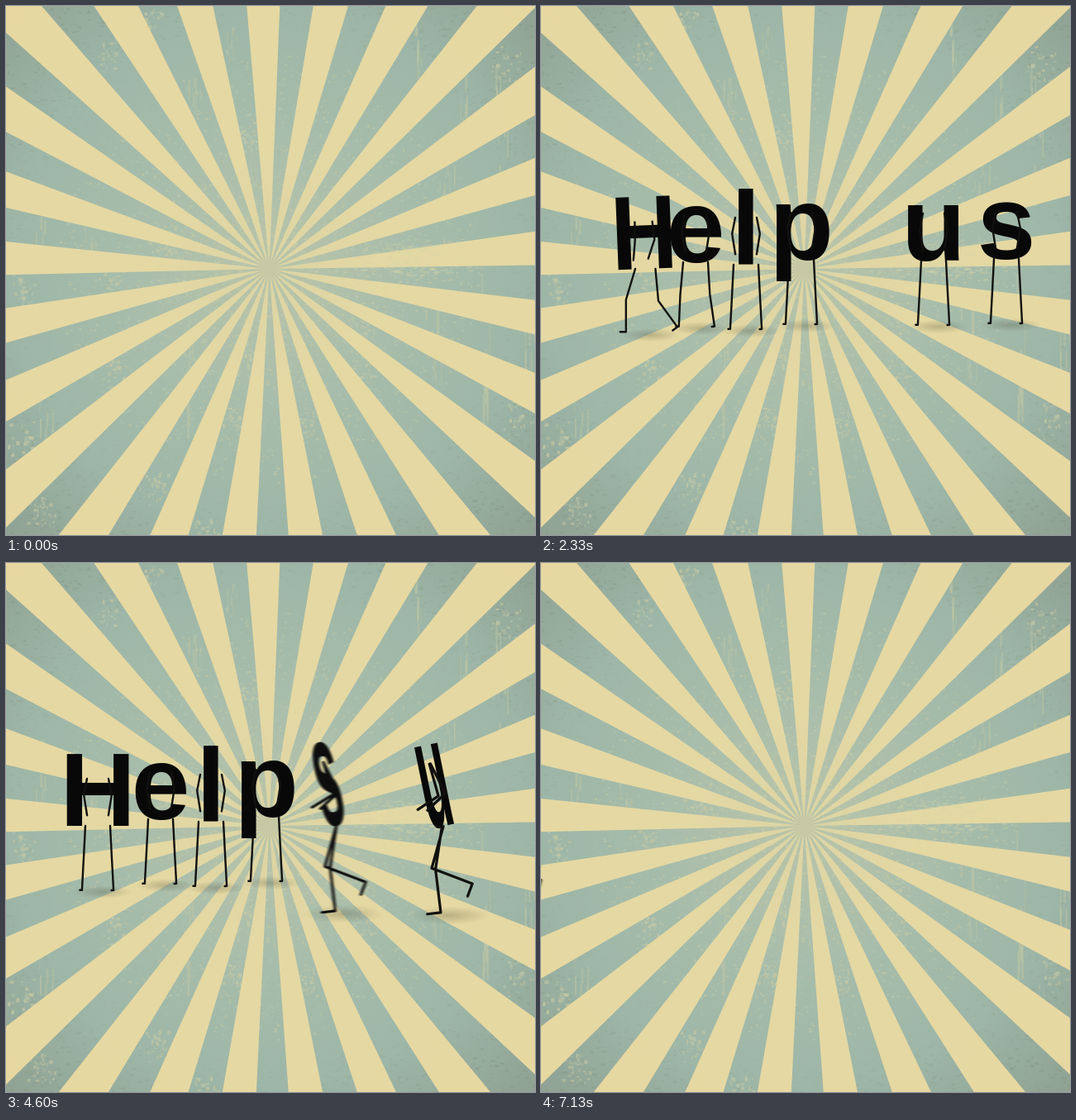
Write an HTML page with a canvas that moves like this. It is 640 px wide and 640 px high and loops after 7.19 s.

```html
<!DOCTYPE html>
<html lang="en">
<head>
<meta charset="utf-8">
<title>Help us</title>
<style>
  html, body { margin: 0; width: 100%; height: 100%; overflow: hidden; background: #9fb9ab; }
  canvas, svg { position: absolute; left: 0; top: 0; width: 100%; height: 100%; display: block; }
  text { font: bold 127px "Liberation Sans", Arial, sans-serif; text-anchor: middle; fill: #080808; }
  path { fill: none; stroke: #11110f; stroke-width: 2.4; stroke-linecap: round; stroke-linejoin: round; }
</style>
</head>
<body>
<canvas id="paper" width="640" height="640"></canvas>
<svg id="stage" viewBox="0 0 640 640">
  <defs>
    <radialGradient id="shade">
      <stop offset="0" stop-color="#4c4a35" stop-opacity=".28"/>
      <stop offset="1" stop-color="#4c4a35" stop-opacity="0"/>
    </radialGradient>
    <filter id="rush" x="-60%" y="-20%" width="220%" height="140%">
      <feGaussianBlur stdDeviation="1.2 .4"/>
    </filter>
  </defs>
</svg>
<script>
const LOOP = 7190, CX = 318.5, CY = 318, RAD = Math.PI / 180;

// ---------- sunburst paper ----------
let seed = 11;
const rnd = () => (seed = (seed * 16807) % 2147483647) / 2147483647;
const bell = () => rnd() + rnd() + rnd() - 1.5;

function paintPaper() {
  const g = document.getElementById('paper').getContext('2d');
  const dot = (x, y, w, h, color, alpha) => {
    g.globalAlpha = alpha;
    g.fillStyle = color;
    g.fillRect(x, y, w, h);
  };
  const radial = (radius, stops) => {
    const grad = g.createRadialGradient(CX, CY, 0, CX, CY, radius);
    stops.forEach(([at, color]) => grad.addColorStop(at, color));
    return grad;
  };
  g.fillStyle = radial(450, [[0, '#b9c4a9'], [.35, '#a8bdab'], [.7, '#9db6a7'], [1, '#8fa293']]);
  g.fillRect(0, 0, 640, 640);

  for (let i = 0; i < 4200; i++) {
    const x = rnd() * 640, y = rnd() * 640, far = Math.hypot(x - CX, y - CY);
    if (far > 270) dot(x, y, 1 + rnd() * 5, 1 + rnd() * 2, '#84947f', .32 * Math.min(1, (far - 270) / 110));
  }
  for (let i = 0; i < 3600; i++) {
    const a = rnd() * 2 * Math.PI, r = 30 + rnd() * 230;
    dot(CX + r * Math.cos(a), CY + r * Math.sin(a), 1 + rnd() * 3, 1 + rnd() * 2, '#d0cfa4', .12 + rnd() * .3);
  }

  const worn = [[122, 60], [175, 12], [290, 160], [20, 348], [128, 340], [196, 290], [20, 522], [45, 610],
    [180, 580], [275, 500], [293, 425], [432, 380], [435, 440], [365, 505], [605, 75], [620, 500], [130, 435], [240, 637]];
  for (const [x, y] of worn)
    for (let i = 0; i < 34; i++)
      dot(x + bell() * 18, y + bell() * 24, 1 + rnd() * 4, 1 + rnd() * 4, '#cbccA5', .2 + rnd() * .4);

  const scratches = [[42, 240, 90], [100, 260, 70], [230, 120, 80], [222, 440, 150], [270, 45, 40], [499, 55, 80],
    [555, 120, 130], [598, 120, 170], [532, 240, 110], [580, 400, 190], [515, 400, 120], [632, 400, 120], [47, 510, 110]];
  for (const [x, y, len] of scratches)
    for (let i = 0; i < 10; i++)
      dot(x + bell() * 9, y + (rnd() - .5) * len, 1 + rnd() * 2, len * (.1 + rnd() * .25), '#c5c9a4', .2 + rnd() * .25);

  // 25 rays, drawn slightly askew toward the lower right
  g.globalAlpha = 1;
  g.fillStyle = radial(450, [[0, '#dcd4a4'], [.3, '#e4d8a3'], [1, '#e7d8a1']]);
  g.beginPath();
  for (let k = 0; k < 25; k++) {
    const even = k * 14.4 - 91.3;
    const mid = even + 1.2 * Math.max(0, Math.cos((even - 45) * RAD)) ** 2;
    g.moveTo(CX, CY);
    for (const a of [mid - 3.6, mid + 3.6])
      g.lineTo(CX + 700 * Math.cos(a * RAD), CY + 700 * Math.sin(a * RAD));
  }
  g.fill();

  for (let i = 0; i < 900; i++) {
    const a = rnd() * 2 * Math.PI, r = 20 + rnd() * 150;
    dot(CX + r * Math.cos(a), CY + r * Math.sin(a), 1 + rnd() * 3, 1 + rnd() * 1.5, '#cbd0ab', .14);
  }
  for (let i = 0; i < 260; i++)
    dot(490 + bell() * 65, 305 + bell() * 22, 2 + rnd() * 6, 1 + rnd() * 2, '#d6d5a9', .25);
  g.globalAlpha = 1;
  g.fillStyle = radial(20, [[0, '#c5c8a3'], [.45, '#c5c8a3cc'], [1, '#c5c8a300']]);
  g.fillRect(CX - 20, CY - 20, 40, 40);
}

// ---------- walking letters ----------
const letters = [
  { char: 's', x: 563, y: 306, arrive: 360, leave: 3650, near: 1.35, speed: 574 },
  { char: 'u', x: 475, y: 308, arrive: 850, leave: 4180, near: 1.35, speed: 574 },
  { char: 'p', x: 315, y: 307, arrive: 1580, leave: 5140, near: 1.3, speed: 574 },
  { char: 'l', x: 248, y: 313, arrive: 1960, leave: 5520, near: 1.25, speed: 574 },
  { char: 'e', x: 187, y: 310, arrive: 2290, leave: 5560, near: 1.12, speed: 574 },
  { char: 'H', x: 111, y: 318, arrive: 2400, leave: 5870, near: 1.2, speed: 165 }
];

const SVG = 'http://www.w3.org/2000/svg';
function add(parent, tag, attrs = {}) {
  const node = document.createElementNS(SVG, tag);
  set(node, attrs);
  return parent.appendChild(node);
}
function set(node, attrs) {
  for (const key in attrs) node.setAttribute(key, attrs[key]);
}
const mix = (a, b, k) => a + (b - a) * k;
const clamp = v => Math.max(0, Math.min(1, v));
const smooth = v => { v = clamp(v); return v * v * (3 - 2 * v); };
// distance covered when easing into a steady pace
const run = s => s > 0 ? s * s / (s + .15) : 0;

for (const m of letters) {
  m.root = add(document.getElementById('stage'), 'g');
  add(m.root, 'ellipse', { cx: 6, cy: 80, rx: 36, ry: 8, fill: 'url(#shade)' });
  m.legs = add(m.root, 'path');
  m.body = add(m.root, 'g');
  m.glyph = add(m.body, 'text');
  m.glyph.textContent = m.char;
  m.arms = add(m.body, 'path');
}

// Two-part limb; angles in degrees from straight down, positive toward the right
function limb(x, y, upper, length1, lower, length2, foot = 0) {
  const pts = [[x, y]];
  const step = (dx, dy) => { x += dx; y += dy; pts.push([x, y]); };
  step(length1 * Math.sin(upper * RAD), length1 * Math.cos(upper * RAD));
  step(length2 * Math.sin(lower * RAD), length2 * Math.cos(lower * RAD));
  if (foot) step(-foot * Math.cos(lower * RAD), foot * Math.sin(lower * RAD));
  return 'M' + pts.map(p => p.map(v => v.toFixed(1)).join(' ')).join('L');
}

function pose(m, t) {
  const before = (m.arrive - t) / 1000, after = (t - m.leave) / 1000;
  const size = mix(1, m.near, smooth((after - .08) / .3));
  const turn = Math.max(smooth(before / .25), smooth((after - .2) / .25));
  const walk = Math.max(smooth((before + .1) / .35), smooth((after - .16) / .25));
  const dip = 13 * Math.sin(Math.PI * clamp(after / .26));
  const x = CX + (m.x - CX) * size + 700 * run(before) - m.speed * run(after - .4);
  const y = m.y + (size - 1) * 30 + dip;
  const visible = x > -90 && x < 690;
  m.root.style.display = visible ? '' : 'none';
  if (!visible) return;

  const phase = (t - 5270) / 69.4 - 1.2;
  // the first steps come toward the viewer, left foot then right
  const tread = Math.sin(2 * Math.PI * clamp(after / .36)) * (1 - turn);
  let legs = '', arms = '';
  for (const side of [-1, 1]) {
    const swing = phase + (side > 0 ? Math.PI : 0);
    const lift = Math.max(0, -side * tread), reach = Math.max(0, side * tread);
    const thigh = mix(side * (3 + 8 * reach), -12 - 22 * Math.cos(swing), walk);
    const bend = walk * (50 - 35 * Math.sin(swing)) + lift * 60;
    legs += limb(side * 15 * (1 - turn), 0, thigh, 39 * (1 - .5 * lift), thigh + bend,
      39 * (1 - .5 * lift), mix(2.5, 12, walk));
    const upper = mix(side * 11, 10 + 34 * Math.cos(swing), turn);
    const lower = mix(-side * 9, upper - 75, turn);
    arms += limb(side * 13 * (1 - turn), -57, upper, mix(20, 30, turn), lower, mix(25, 22, turn));
  }
  const rushing = before > .3 || m.speed * run(after - .4) > 50;
  set(m.root, {
    transform: `translate(${x.toFixed(2)} ${y.toFixed(2)}) scale(${size.toFixed(3)})`,
    filter: rushing ? 'url(#rush)' : 'none'
  });
  set(m.legs, { d: legs });
  set(m.arms, { d: arms });
  set(m.body, { transform: `rotate(${-12 * turn})` });
  // edge-on letters narrow; near ones loom taller
  set(m.glyph, { transform: `scale(${mix(1, m.char === 'l' ? .4 : .32, turn)} ${1 + (size - 1) * .3})` });
}

function frame(now) {
  const t = Math.max(0, now - start) % LOOP;
  letters.forEach(m => pose(m, t));
  requestAnimationFrame(frame);
}

paintPaper();
const start = performance.now();
frame(start);
</script>
</body>
</html>
```
